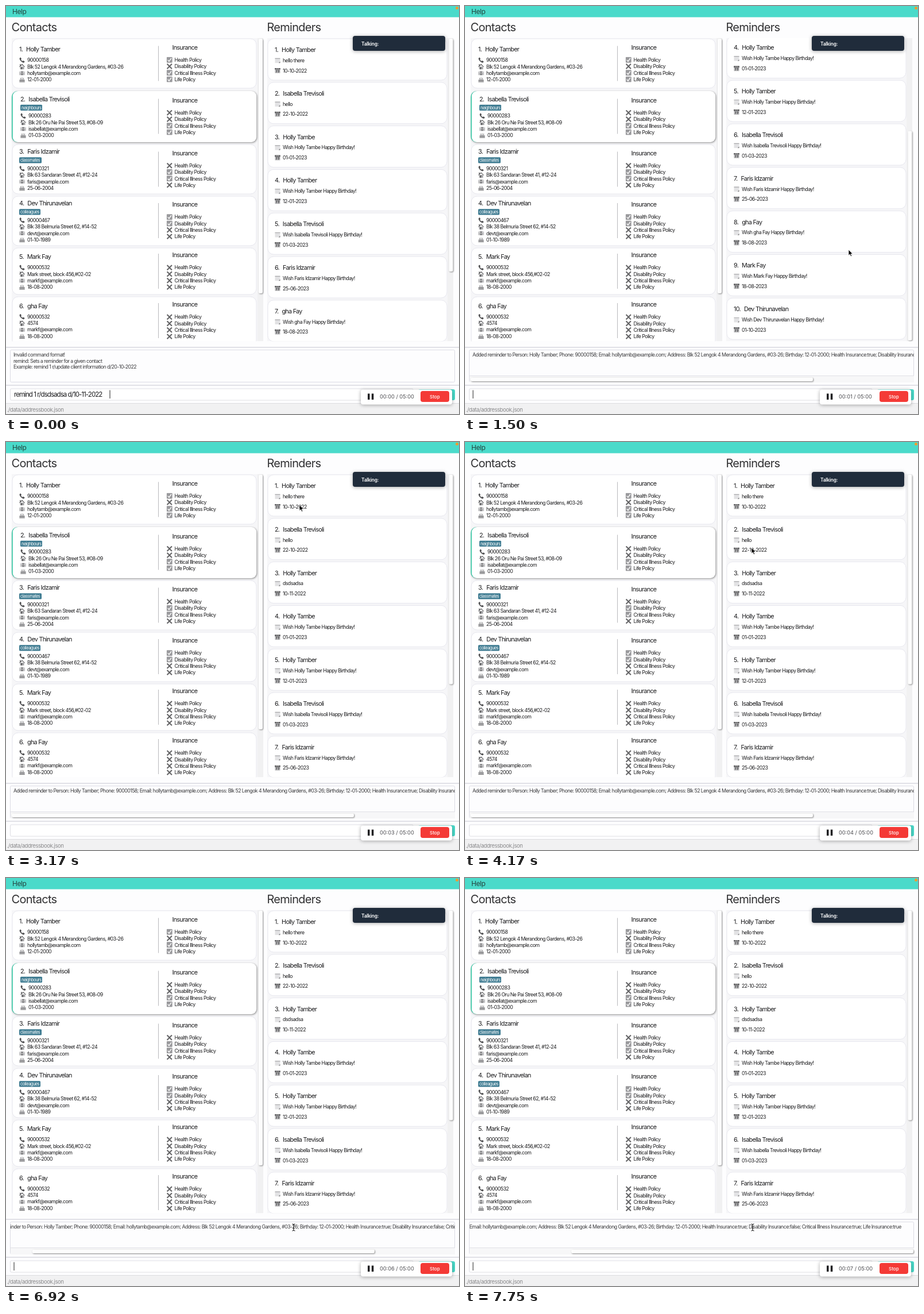
Recreate the animation shown at these times as an HTML page. Size 789 by 710 pixels, loop 8000 ms.

```html
<!DOCTYPE html>
<html lang="en">
<head>
<meta charset="utf-8">
<title>Contacts and reminders</title>
<style>
html, body { margin: 0; width: 100%; height: 100%; overflow: hidden; background: #fdfdfe; }
svg { display: block; }
text { font: 8.8px Inter, "Open Sans", sans-serif; letter-spacing: -.066em; fill: #1c1c1e; white-space: pre; }
.big { font-size: 10.8px; }
.head { font-size: 20px; letter-spacing: -.036em; fill: #303032; }
.menu { font-size: 12px; letter-spacing: -.04em; fill: #24443f; }
.tag { font-size: 7.4px; fill: #fff; }
.cmd { font-size: 11.5px; letter-spacing: -.081em; }
.log { fill: #3a3a3c; }
.path { font-size: 9.6px; letter-spacing: -.05em; fill: #8a8a8c; }
.talk { font-size: 8.3px; font-weight: 600; letter-spacing: -.02em; fill: #fff; }
.time { font-size: 9.2px; letter-spacing: 0; fill: #4c4c50; }
.stop { font-size: 8px; font-weight: 500; letter-spacing: 0; fill: #fff; }
.card { fill: #fff; stroke: #e7e7ee; }
.thumb { fill: #fdfdfd; filter: drop-shadow(1px 1px 1px #8a8a8a); }
.lift { filter: drop-shadow(1px 1.5px 1.5px #8c8c8c); }
.float { filter: drop-shadow(0 1px 3px #0005); }
</style>
</head>
<body>
<svg width="789" height="710" viewBox="0 0 789 710">
  <defs>
    <clipPath id="listClip"><rect y="55.5" width="789" height="528"/></clipPath>
    <clipPath id="logClip"><rect x="7.5" y="599" width="774.5" height="46"/></clipPath>
    <symbol id="phone" viewBox="0 0 10 10" overflow="visible"><path d="M1 1.2 2.6.4 4 3 3 4.2q1 1.9 2.8 2.8L7 6l2.6 1.5-.9 1.7Q7.500 10 5.600 9 2.200 7.200.8 4 .2 2.200 1 1.200Z" fill="#505052"/></symbol>
    <symbol id="home" viewBox="0 0 10 10"><path d="M1.500 5h7v4.800h-7Z" fill="#a6a6a8"/><path d="M0 5.300 5 .4l5 4.900-.8.5L5 2 .8 5.800ZM1.200.8h1.500v2.500l-1.500 1ZM3.200 6h1.900v3.800H3.200Z" fill="#565658"/></symbol>
    <symbol id="mail" viewBox="0 0 10 10"><path d="M0 2h10v6.500H0Z" fill="#c4c4c6"/><path d="M3 2h4v6.500H3Z" fill="#858587"/><path d="M0 2l5 3.500L10 2" fill="none" stroke="#f2f2f2" stroke-width=".7"/></symbol>
    <symbol id="cake" viewBox="0 0 10 10"><path d="M.5 5q4.500-2 9 0v4h-9Z" fill="#b8b8ba"/><path d="M.3 8.500h9.400v1H.3ZM2 2h.8v2.500H2ZM4.600 1.300h.8V4h-.8ZM7.200 2H8v2.500h-.8ZM.5 6h9v.9h-9Z" fill="#717173"/></symbol>
    <symbol id="note" viewBox="0 0 10 10"><path d="M.5 1h9v6l-2 2.500h-7Z" fill="#e2e2e4"/><path d="M.5 1h9v1.200h-9Z" fill="#a9a9ab"/><path d="M6.800 9.500 9.500 6.800V9.500Z" fill="#757577"/></symbol>
    <symbol id="date" viewBox="0 0 10 10"><path d="M.5 3h9v6.500h-9Z" fill="#b4b4b6"/><path d="M.2.6h9.600v2.700H.2ZM2 4.400h2.300v1L3.300 8.500H2.200l1-3H2ZM5.300 4.400h2.900v1L7 8.500H5.800l1-3H5.300Z" fill="#565658"/><path d="M2 1.500h6" stroke="#ccc" stroke-width=".7"/></symbol>
    <symbol id="yes" viewBox="0 0 10 10"><rect x=".3" y=".3" width="9.400" height="9.400" rx="1" fill="#9a9a9d"/><path d="M2.200 5.200 4.300 7.600 8 2.200" fill="none" stroke="#fff" stroke-width="1.300"/></symbol>
    <symbol id="no" viewBox="0 0 10 10"><path d="M1 1 9 9M9 1 1 9" stroke="#666668" stroke-width="2"/></symbol>
  </defs>
  <g id="app"></g>
</svg>
<script>
const $ = id => document.getElementById(id);
const text = (x, y, s, cls = '') => `<text x="${x}" y="${y}" class="${cls}">${s}</text>`;
const rect = (x, y, w, h, fill, rx = 0, more = '') =>
  `<rect x="${x}" y="${y}" width="${w}" height="${h}" rx="${rx}" fill="${fill}" ${more}/>`;
const icon = (id, x, y, size = 10) =>
  `<use href="#${id}" x="${x}" y="${y - size / 2}" width="${size}" height="${size}"/>`;
const title = (x, y, n, name) => text(x, y + 3.9, `${n}.<tspan dx="6">${name}</tspan>`, 'big');

const HOLLY = 'Holly Tamber', BELLA = 'Isabella Trevisoli', FARIS = 'Faris Idzamir',
  DEV = 'Dev Thirunavelan', MARK = 'Mark Fay', GHA = 'gha Fay';
const HOME = 'Blk 52 Lengok 4 Merandong Gardens, #03-26';

// card top, card height, title y, insurance y, policies held
const contacts = [
  { box: [57, 86, 75.5, 72], has: '1011', name: HOLLY, rows: ['90000158', HOME, 'hollytamb@example.com', '12-01-2000'] },
  { box: [148, 89, 162, 164], has: '0011', name: BELLA, tag: ['neighbours', 38], picked: true,
    rows: ['90000283', 'Blk 26 Oru Ne Pai Street 53, #08-09', 'isabellat@example.com', '01-03-2000'] },
  { box: [241, 86, 253.5, 256], has: '0110', name: FARIS, tag: ['classmates', 39],
    rows: ['90000321', 'Blk 63 Sandaran Street 41, #12-24', 'faris@example.com', '25-06-2004'] },
  { box: [331, 86, 343.5, 345.5], has: '1100', name: DEV, tag: ['colleagues', 37],
    rows: ['90000467', 'Blk 38 Belmuria Street 62, #14-52', 'devt@example.com', '01-10-1989'] },
  { box: [421, 81, 436.5, 433.5], has: '0000', name: MARK,
    rows: ['90000532', 'Mark street, block 456,#02-02', 'markf@example.com', '18-08-2000'] },
  { box: [506, 86, 522, 519.5], has: '0000', name: GHA,
    rows: ['90000532', '4574', 'markf@example.com', '18-08-2000'] }
];
const POLICIES = ['Health', 'Disability', 'Critical Illness', 'Life'];

function contactCard({ box: [top, h, ty, iy], has, name, tag, picked, rows }, i) {
  const x = picked ? 25 : 23, first = tag ? ty + 29.2 : ty + 18.6;
  let s = picked
    ? `<g class="lift">${rect(10, top, 60, h, '#38c6a4', 10)}${rect(11.7, top, 424.5, h, '#fff', 9)}</g>`
    : `<rect class="card" x="11" y="${top}" width="425" height="${h}" rx="10"/>`;
  s += title(x, ty, i + 1, name);
  if (tag) s += rect(x, ty + 9.7, tag[1], 10.4, '#3e7b91', 1.5) + text(x + 2, ty + 17.5, tag[0], 'tag');
  rows.forEach((row, k) => {
    const y = first + k * 11.3;
    s += icon(['phone', 'home', 'mail', 'cake'][k], x, y) + text(x + 14, y + 3.2, row);
  });
  s += rect(265, iy - 2.5, 1, 61, '#b9b9bd') + text(289.5, iy + 3.9, 'Insurance', 'big');
  POLICIES.forEach((p, k) => {
    const y = iy + 21.7 + k * 11.3;
    s += icon(+has[k] ? 'yes' : 'no', 279.5, y, 10.5) + text(293.5, y + 3.2, p + ' Policy');
  });
  return s;
}

const wish = (name, date) => [name, `Wish ${name} Happy Birthday!`, date];
const before = [
  [HOLLY, 'hello there', '10-10-2022'], [BELLA, 'hello', '22-10-2022'],
  wish('Holly Tambe', '01-01-2023'), wish(HOLLY, '12-01-2023'), wish(BELLA, '01-03-2023'),
  wish(FARIS, '25-06-2023'), wish(GHA, '18-08-2023'), wish(MARK, '18-08-2023'), wish(DEV, '01-10-2023')
];
const after = [...before.slice(0, 2), [HOLLY, 'dsdsadsa', '10-11-2022'], ...before.slice(2)];
const PITCH = 75.8, VIEW = 527;

const reminders = list => list.map(([name, note, date], i) => {
  const y = 57 + i * PITCH;
  return `<rect class="card" x="456" y="${y}" width="312" height="72" rx="10"/>` +
    title(468, y + 19, i + 1, name) +
    icon('note', 468, y + 37.7) + text(482, y + 40.8, note) +
    icon('date', 468, y + 55.3) + text(482, y + 58.5, date);
}).join('');

const added = `Added reminder to Person: ${HOLLY}; Phone: 90000158; Email: hollytamb@example.com; Address: ${HOME}; ` +
  'Birthday: 12-01-2000; Health Insurance:true; Disability Insurance:false; Critical Illness Insurance:true; Life Insurance:true';

$('app').innerHTML =
  rect(0, 0, 789, 19.5, '#4adaca') + text(11, 13.5, 'Help', 'menu') +
  '<circle cx="785.500" cy="3.500" r="2.500" fill="#f29a2e"/>' +
  text(9.5, 43.5, 'Contacts', 'head') + text(454.5, 43.5, 'Reminders', 'head') +
  '<g clip-path="url(#listClip)">' +
  rect(10, 55.5, 428, 528, '#f6f6f8') + rect(438, 55.5, 10, 528, '#f1f1f2') +
  contacts.map(contactCard).join('') + rect(440, 57, 7, 443, '#fdfdfd', 2, 'class="thumb"') +
  rect(455, 55.5, 315, 528, '#f6f6f8') + rect(769, 55.5, 10, 528, '#f1f1f2') +
  `<g id="old">${reminders(before)}</g><g id="new">${reminders(after)}</g>` +
  rect(771.5, 57, 7, 405, '#fdfdfd', 2, 'id="bar" class="thumb"') + '</g>' +
  rect(604, 52, 161, 26, '#202c3b', 4, 'class="float"') + text(619, 69, 'Talking:', 'talk') +

  rect(0, 593.5, 789, 1, '#c6c6d2') + rect(0, 659.5, 789, 1, '#c6c6d2') +
  rect(7.5, 598.5, 774, 56, '#fdfdfe', 2, 'stroke="#dcdce4"') +
  '<g id="error">' + ['Invalid command format!', 'remind: Sets a reminder for a given contact',
    'Example: remind 1 r/update client information d/20-10-2022']
    .map((s, i) => text(13, 610 + i * 10.6, s, 'log')).join('') + '</g>' +
  '<g id="done">' + `<g clip-path="url(#logClip)"><g id="log">${text(13, 610, added, 'log')}</g></g>` +
  rect(8, 643, 774, 1, '#e0e0e6') + rect(8, 644, 774, 11, '#f7f7f8') +
  rect(10, 646.5, 596, 6.5, '#fdfdfd', 2, 'id="logBar" class="thumb"') + '</g>' +

  rect(7.5, 666, 701.5, 20, '#fff', 2, 'stroke="#dedee4"') +
  `<g id="cmd">${text(14, 680, 'remind 1 r/dsdsadsa d/10-11-2022', 'cmd')}</g>` +
  rect(13.5, 668.5, 1, 14.5, '#222', 0, 'id="caret"') +
  rect(718, 667, 64, 19, '#4adaca', 3) +
  rect(0, 691.5, 789, 19, '#f1f1f2') + rect(0, 691, 789, 1, '#dcdce0') +
  text(1.5, 705.5, './data/addressbook.json', 'path') +
  rect(618, 667.5, 159, 26, '#fff', 4, 'class="float"') +
  rect(630, 674.5, 3.5, 10.5, '#1f1f21') + rect(636.8, 674.5, 3.5, 10.5, '#1f1f21') +
  '<text id="time" class="time" x="651" y="683.200"></text>' +
  rect(722, 670, 50, 19, '#f43a36', 4) + text(738, 682.5, 'Stop', 'stop') +
  '<path id="arrow" d="M0 0V10.200L2.300 8 4 11.800 5.700 11 4.100 7.400H7.200Z" fill="#000" stroke="#fff" stroke-width=".8"/>' +
  '<path id="beam" d="M-2.500-6Q0-6 0-4.500 0-6 2.500-6M0-5V5M-2.500 6Q0 6 0 4.500 0 6 2.500 6M-1.300 1.500H1.300" fill="none" stroke="#111" stroke-width="1"/>';

const scrollKeys = [[0, 0], [1330, 115], [1500, 231], [1920, 150], [2000, 61.5], [2170, 0]];
const logKeys = [[0, 0], [6920, 46], [7000, 90], [7080, 125], [7170, 150], [7250, 168], [7330, 180], [7750, 225]];
const mouseKeys = [
  [920, 640, 440], [1000, 668, 424], [2250, 668, 424], [2500, 524, 275], [2750, 522, 152], [2920, 519, 144],
  [3170, 511, 109], [3420, 512, 117], [3580, 509, 128], [4000, 499, 180], [4170, 499, 184], [4750, 499, 184],
  [5000, 500, 149], [5250, 500, 150], [5500, 501.5, 177], [5830, 506, 197], [6000, 504, 225],
  [6170, 405, 330], [6330, 492, 495], [6500, 498, 570], [6670, 501, 608]
];

const held = (keys, t) => keys.findLast(k => t >= k[0] - 4)[1];

function glide(keys, t) {
  const i = keys.findIndex(k => k[0] > t);
  if (i < 1) return (i ? keys.at(-1) : keys[0]).slice(1);
  const [a, b] = [keys[i - 1], keys[i]], p = (t - a[0]) / (b[0] - a[0]);
  return [1, 2].map(j => a[j] + (b[j] - a[j]) * p);
}

const set = (id, name, value) => $(id).setAttribute(name, value);
const show = (id, on) => set(id, 'visibility', on ? 'visible' : 'hidden');
const move = (id, x, y) => set(id, 'transform', `translate(${x} ${y})`);

function draw(ms) {
  const step = 1000 / 12, t = Math.floor((ms + 4) / step) * step;
  const sent = t >= 499, total = (sent ? after : before).length * PITCH;
  const scroll = held(scrollKeys, t), shift = held(logKeys, t);

  show('old', !sent); show('new', sent);
  show('error', !sent); show('done', sent);
  show('cmd', !sent);
  move('new', 0, -scroll);
  set('bar', 'height', VIEW * VIEW / total - 2);
  move('bar', 0, scroll * VIEW / total);
  move('log', -shift, 0);
  move('logBar', shift * .778, 0);

  show('caret', !sent || Math.floor((t + 1) / 500) % 2);
  move('caret', sent ? 0 : 167, 0);
  $('time').textContent = `00:0${Math.max(0, Math.floor((t - 166) / 1000))} / 05:00`;

  const typing = t < 915, overLog = t >= 6660;
  const [x, y] = typing ? [200.5, 679] : glide(mouseKeys, t);
  show('beam', typing ? t > 79 : overLog);
  show('arrow', !typing && !overLog);
  move('beam', x, y);
  move('arrow', x, y);
}

const start = performance.now();
function tick() {
  draw((performance.now() - start) % 8000);
  requestAnimationFrame(tick);
}
tick();
</script>
</body>
</html>
```
